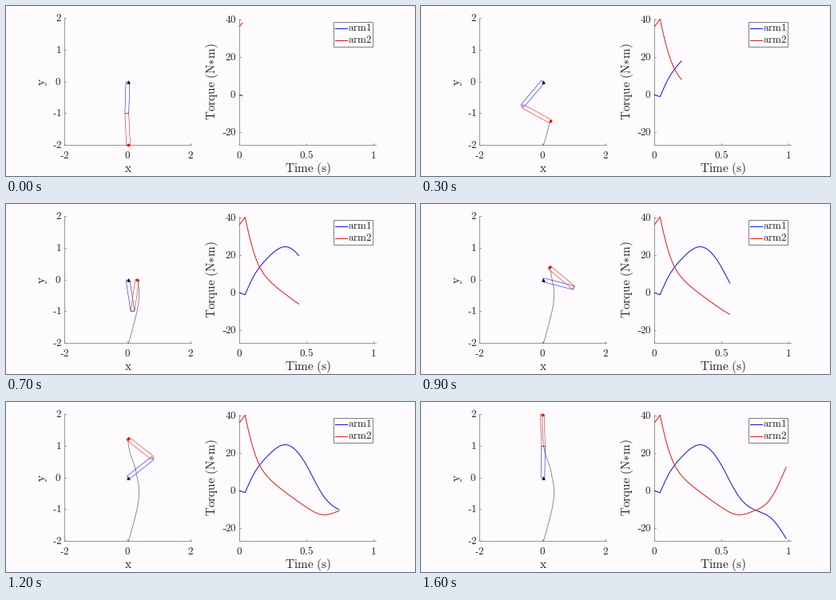
A matplotlib script for the animation above (1700 ms loop, 512 by 213 pixels).

```python
import numpy as np
import matplotlib
import matplotlib.pyplot as plt
from matplotlib.animation import FuncAnimation
from matplotlib.patches import Polygon, Rectangle

W, H, DPI = 512, 213, 64
PT = 72 / DPI                      # points per pixel
FRAMES, INTERVAL = 17, 100
STEP = 0.02                        # simulation time step in seconds
BACK, AXIS, INK = "#fdfbfe", "#808080", "#262626"
BLUE, RED = "#1010d4", "#dc1a1a"
TICK, LABEL, LEGEND = 13.2, 15.3, 13   # text sizes in pixels

matplotlib.rcParams["mathtext.fontset"] = "cm"

fig = plt.figure(figsize=(W / DPI, H / DPI), dpi=DPI, facecolor=BACK)
ax = fig.add_axes([0, 0, 1, 1])
ax.set_xlim(0, W)
ax.set_ylim(H, 0)
ax.axis("off")


# Mapping from data to pixels
def arm_px(x, y):
    return 152.5 + 39.7 * x, 95 - 39.7 * y


def plot_px(t, v):
    return 292.5 + 168 * t, 111.3 - 2.345 * v


# Arm motion
def bend(t):
    """Elbow angle: one swing out and back with a soft start."""
    eased = np.hypot(t, 0.025) - 0.025
    return 2.85 * np.sin((3.93 - 0.67 * t) * eased)


def aim(t):
    """Direction of the hand from straight down, an S-curve to straight up."""
    d = t - 0.44
    return 3.15 / (1 + np.exp(-d * (12.2 + 12 * d + 40 * d * d)))


def joints(t):
    first, second = aim(t) - bend(t) / 2, aim(t) + bend(t) / 2
    ex, ey = np.sin(first), -np.cos(first)
    return (ex, ey), (ex + np.sin(second), ey - np.cos(second))


def link(p, q, half=0.06):
    """Corners of a bar from p to q, in pixels."""
    p, q = np.array(p), np.array(q)
    d = (q - p) / np.hypot(*(q - p))
    n = half * np.array([-d[1], d[0]])
    return [arm_px(*c) for c in (p + n, q + n, q - n, p - n)]


# Torque curves
def spline(keys, t):
    """Natural cubic spline through the (x, y) keys, evaluated at t."""
    x, y = np.array(keys, float).T
    n, h, slope = len(x), np.diff(x), np.diff(y) / np.diff(x)
    a, b = np.eye(n), np.zeros(n)
    for i in range(1, n - 1):
        a[i, i - 1:i + 2] = h[i - 1], 2 * (h[i - 1] + h[i]), h[i]
        b[i] = 6 * (slope[i] - slope[i - 1])
    m = np.linalg.solve(a, b)
    i = np.clip(np.searchsorted(x, t) - 1, 0, n - 2)
    d = t - x[i]
    c = slope[i] - h[i] * (2 * m[i] + m[i + 1]) / 6
    return y[i] + d * (c + d * (m[i] / 2 + d * (m[i + 1] - m[i]) / (6 * h[i])))


def torque(start, keys):
    """Straight ramp from start to the first key, then a smooth course."""
    t0, v0 = keys[0]
    ramp = start + (v0 - start) * times / t0
    return np.where(times < t0, ramp, spline(keys, times))


times = np.arange(3 * FRAMES - 1) * STEP
tau1 = torque(0, [(.04, -1), (.1, 8.3), (.2, 18), (.35, 24.6), (.5, 13.4),
                  (.62, -2.3), (.74, -10), (.88, -15.4), (.98, -25.5)])
tau2 = torque(36.5, [(.04, 40.5), (.08, 28), (.14, 15), (.2, 8.2), (.32, .4),
                     (.5, -8.9), (.62, -12.8), (.74, -10.7), (.86, -4.6),
                     (.98, 12.7)])


# Static parts
def line(xs, ys, color, width, **kw):
    return ax.plot(xs, ys, color=color, lw=width * PT, **kw)[0]


def rule(xs, ys):
    """Axis line; the half pixel makes it snap onto the wanted row or column."""
    line(np.array(xs) - 0.5, np.array(ys) - 0.5, AXIS, 0.8)


def text(x, y, body, size, **kw):
    ax.text(x, y, f"${body}$", fontsize=size * PT, color=INK, va="baseline",
            rotation_mode="anchor", **kw)


def number(right, base, label):
    """Right-aligned tick number, with a hyphen as its sign."""
    digits = label.lstrip("-")
    text(right, base, r"\mathrm{%s}" % digits, TICK, ha="right")
    if digits != label:
        end = right - TICK * (0.5 * len(digits) + 0.05)
        line([end - 0.27 * TICK, end], [base - 0.22 * TICK] * 2, INK, 0.9,
             solid_capstyle="butt")


def label_width(label):
    return TICK * sum({"-": .333, ".": .278}.get(c, .5) for c in label)


def frame_axes(left, right, top, to_px, xticks, yticks, bottom=174.4):
    rule([left, left, right], [top, bottom, bottom])
    for v in xticks:
        x, label = to_px(v, 0)[0], f"{v:g}"
        rule([x, x], [bottom, bottom - 2])
        number(x + label_width(label) / 2, 190.6, label)
    for v in yticks:
        y = to_px(0, v)[1]
        rule([left, left + 2], [y, y])
        number(left - 4, y + 3.6, f"{v:g}")


frame_axes(73.5, 232, 15.5, arm_px, (-2, 0, 2), range(-2, 3))
frame_axes(292.5, 463.5, 16.3, plot_px, (0, 0.5, 1), range(-20, 41, 20))

text(152.5, 207.5, r"\mathrm{x}", LABEL, ha="center")
text(49.5, 95, r"\mathrm{y}", LABEL, ha="center", rotation=90)
text(378, 208, r"\mathrm{Time\ (s)}", LABEL, ha="center")
text(262.5, 95, r"\mathrm{Torque\ (N}\text{*}\mathrm{m)}", LABEL,
     ha="center", rotation=90)

# Legend
ax.add_patch(Rectangle((410, 20), 49, 31, fc="white", ec="#606060",
                       lw=0.8 * PT, zorder=5))
for y, color, name in ((27.5, BLUE, "arm1"), (42.5, RED, "arm2")):
    line([412, 427], [y, y], color, 1, zorder=6)
    text(428.4, y + 3.8, r"\mathrm{%s}" % name, LEGEND, ha="left", zorder=6)


# Moving parts
def bar(color):
    return ax.add_patch(Polygon([(0, 0)] * 4, fill=False, ec=color,
                                lw=0.55 * PT, zorder=3))


trace = line([], [], "#202020", 0.9, linestyle=(0, (1.3, 1.1)))
bar1, bar2 = bar(BLUE), bar(RED)
hand, = ax.plot([], [], "o", color="#ff0000", ms=3.8 * PT, mew=0, zorder=4)
ax.plot(152.5, 95, "^", color="black", ms=4.6 * PT, mew=0, zorder=4)
curve1, curve2 = line([], [], BLUE, 1), line([], [], RED, 1)


def update(k):
    count = 3 * k + 2
    now = times[count - 1]
    elbow, tip = joints(now)
    bar1.set_xy(link((0, 0), elbow))
    bar2.set_xy(link(elbow, tip))
    hand.set_data(*[[c] for c in arm_px(*tip)])
    trace.set_data(*arm_px(*joints(np.linspace(0, now, 6 * count))[1]))
    curve1.set_data(*plot_px(times[:count], tau1[:count]))
    curve2.set_data(*plot_px(times[:count], tau2[:count]))
    return bar1, bar2, hand, trace, curve1, curve2


anim = FuncAnimation(fig, update, frames=FRAMES, interval=INTERVAL,
                     repeat=True, repeat_delay=0)
plt.show()
```
